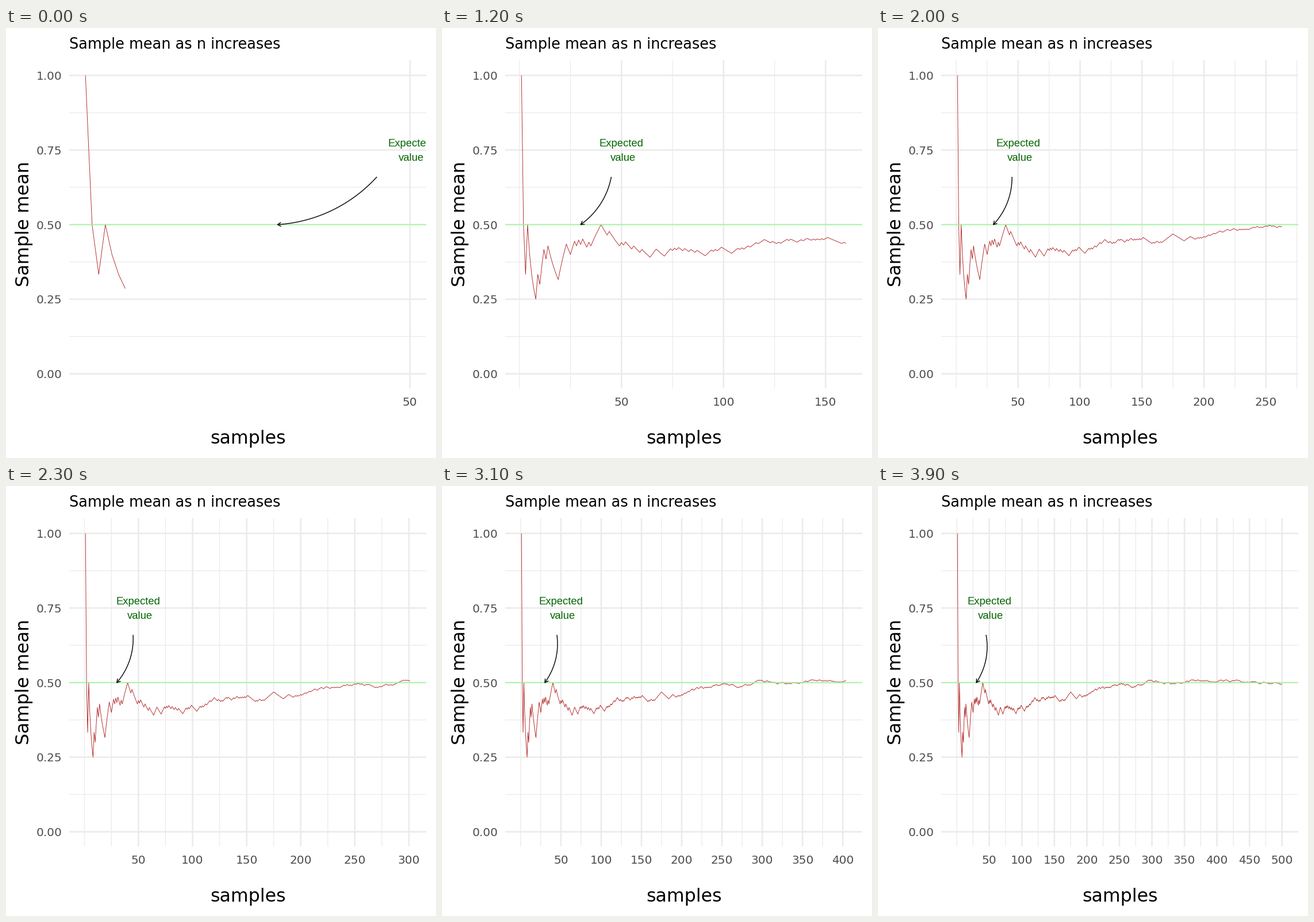
A matplotlib script for the animation above (5 s loop, 748 by 748 pixels).

```python
import random

import matplotlib.pyplot as plt
import numpy as np
from matplotlib.animation import FuncAnimation
from matplotlib.patches import Rectangle

SIZE, DPI = 748, 64
PT = 72 / DPI  # points per pixel
FRAMES, REVEAL, TOTAL = 50, 39, 500
LEFT, RIGHT, TOP, BOTTOM = 110, 731, 56, 627
GRID = "#EBEBEB"
BEND = 2 * np.arctan(0.195)  # half the angle swept by the arrow


def coin_flips(seed, count):
    """Fair flips from a Mersenne Twister filled by a congruential generator."""
    state = []
    for _ in range(675):
        seed = (69069 * seed + 1) % 2**32
        state.append(seed)
    rng = random.Random(0)
    rng.setstate((3, (*state[51:], 624), None))
    return np.array([rng.getrandbits(1) for _ in range(count)])


samples = np.arange(1, TOTAL + 1)
means = np.cumsum(coin_flips(10, TOTAL)) / samples


def y_px(value):
    return 601.5 - 519 * value


fig = plt.figure(figsize=(SIZE / DPI, SIZE / DPI), dpi=DPI, facecolor="white")
ax = fig.add_axes([0, 0, 1, 1])
ax.set(xlim=(0, SIZE), ylim=(SIZE, 0))
ax.axis("off")
panel = Rectangle((LEFT, TOP), RIGHT - LEFT, BOTTOM - TOP, fill=False, lw=0)
ax.add_patch(panel)


def line(xs, ys, color, width, z):
    artist, = ax.plot(xs, ys, color=color, lw=width * PT, zorder=z,
                      solid_capstyle="butt", snap=False)
    artist.set_clip_path(panel)
    return artist


def label(x, y, text, px, color="black", ha="center", font="DejaVu Sans", **kw):
    return ax.text(x, y, text, fontsize=px * PT, color=color, ha=ha,
                   va="baseline", family=font, **kw)


def grid_line(xs, ys, major):
    return line(xs, ys, GRID, 2.6 if major else 1.3, 2 if major else 1)


for i in range(9):
    y = y_px(i / 8)
    grid_line([LEFT, RIGHT], [y, y], i % 2 == 0)
    if i % 2 == 0:
        label(97.5, y + 7.5, f"{i / 8:.2f}", 20, "#4D4D4D", "right")

label(110, 36, "Sample mean as n increases", 25.6, ha="left")
label(421.5, 723.5, "samples", 31.6)
label(40, 340.5, "Sample mean", 31.6, rotation=90, rotation_mode="anchor")

ticks = {x: grid_line([0, 0], [TOP, BOTTOM], x > 0 and x % 50 == 0)
         for x in [0, *range(25, TOTAL + 1, 25)]}
tick_labels = {x: label(0, 657, str(x), 20, "#4D4D4D")
               for x in range(50, TOTAL + 1, 50)}

mean_line = line([], [], "#B22222", 0.9, 3)
line([LEFT, RIGHT], [y_px(0.5)] * 2, "#98FB98", 1.5, 4)
shaft = line([], [], "black", 1.4, 5)
head = line([], [], "black", 1.4, 5)
notes = [(label(0, y, word, 18.5, "#006400", font="Liberation Sans",
                clip_on=True, zorder=6), dx)
         for word, y, dx in (("Expected", 206, 0), ("value", 231, 2.7))]
for note, _ in notes:
    note.set_clip_path(panel)


def draw_arrow(tail, tip):
    t = np.linspace(0, 1, 40)
    arc = (np.exp(2j * BEND * t) - 1) / (np.exp(2j * BEND) - 1)
    path = tail + (tip - tail) * arc
    shaft.set_data(path.real, path.imag)
    heading = np.angle(tip - tail) + BEND
    arms = [tip - 7 * np.exp(1j * (heading + a)) for a in (-np.pi / 6, np.pi / 6)]
    barb = np.array([arms[0], tip, arms[1]])
    head.set_data(barb.real, barb.imag)


def update(frame):
    count = min(TOTAL, int(1 + (frame + 0.5) * (TOTAL - 1) / REVEAL))
    last = max(50, count)
    pad = 0.05 * (last - 1)

    def x_px(x):
        return LEFT + (RIGHT - LEFT) * (x - 1 + pad) / (last - 1 + 2 * pad)

    limit = last + pad
    for x, tick in ticks.items():
        tick.set_xdata([x_px(x)] * 2)
        # minor lines need at least two major ones
        tick.set_visible(x <= limit and (x == 50 or limit >= 100))
    for x, text in tick_labels.items():
        text.set_x(x_px(x))
        text.set_visible(x <= limit)

    mean_line.set_data(x_px(samples[:count]), y_px(means[:count]))
    draw_arrow(complex(x_px(45), y_px(0.66)), complex(x_px(30), y_px(0.5)))
    for note, dx in notes:
        note.set_x(x_px(50) + dx)
    return []


anim = FuncAnimation(fig, update, frames=FRAMES, interval=100,
                     init_func=lambda: update(0), repeat=True, repeat_delay=0)
plt.show()
```
